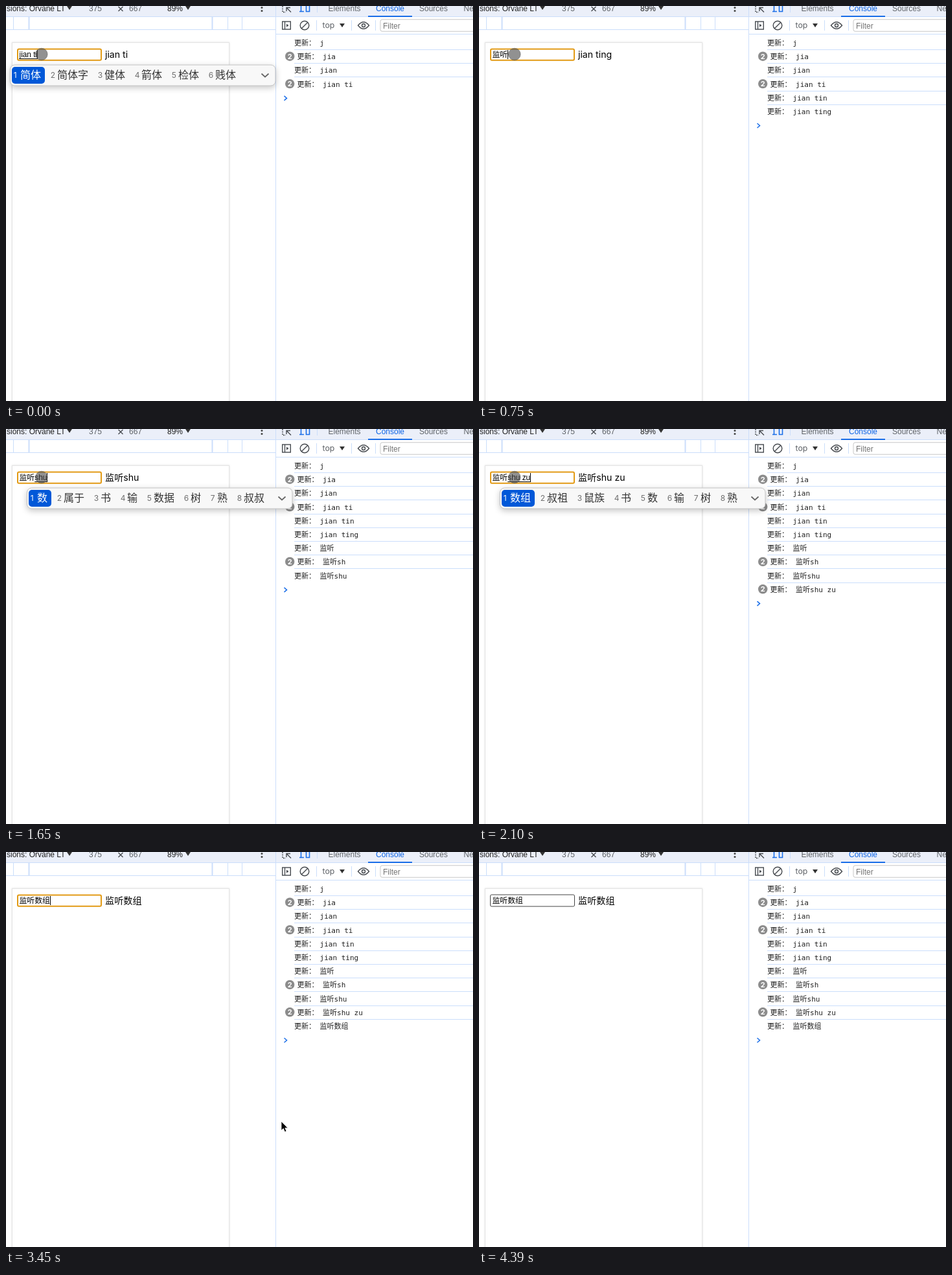
Recreate the animation shown at these times as an HTML page. Size 721 by 610 pixels, loop 4410 ms.

```html
<!DOCTYPE html>
<html lang="zh-CN">
<head>
<meta charset="utf-8">
<title>Input method and console</title>
<style>
html, body { margin: 0; width: 100%; height: 100%; overflow: hidden; background: #fff; }
svg { display: block; }
text { white-space: pre; font: 12px "Liberation Sans", "Noto Sans CJK SC", "Noto Sans CJK", sans-serif; fill: #1f1f1f; }
.field { font-size: 11.86px; fill: #000; }
.label { font: 14.15px Inter, "Noto Sans CJK SC", "Noto Sans CJK", sans-serif; fill: #000; }
.log { font: 11px "DejaVu Sans Mono", "Noto Sans CJK SC", "Noto Sans CJK", monospace; }
.word { font-size: 16px; fill: #333; }
.num { font: 12px Inter, sans-serif; fill: #6e6e6e; }
.on { fill: #fff; }
.badge { font: bold 11px Inter, sans-serif; fill: #fff; text-anchor: middle; }
.ui { font: 12.3px Inter, sans-serif; }
.dim { fill: #5f6368; }
.rule { stroke: #cbdefb; fill: none; }
.icon { stroke: #474b50; stroke-width: 1.4; fill: none; }
.panel { filter: drop-shadow(0 3px 5px rgba(0, 0, 0, .22)); }
</style>
</head>
<body>
<svg width="721" height="610" viewBox="0 0 721 610">
  <!-- device toolbar and rulers -->
  <rect width="721" height="16" fill="#ebeff9"/>
  <text x="1" y="8">sions: Orvane LT</text>
  <text x="128" y="8" class="dim">375</text>
  <text x="190" y="8" class="dim">667</text>
  <text x="249" y="8">89%</text>
  <path d="M94 0h8l-4 6zM277 0h8l-4 6zM515 27h8l-4 6z" fill="#333"/>
  <path d="M173.500 1l7 7m0-7l-7 7" class="icon" stroke-width="1.200"/>
  <g fill="#444"><circle cx="395" cy="2.500" r="1.500"/><circle cx="395" cy="7.500" r="1.500"/></g>
  <path class="rule" d="M0 16.500H721M0 36.500H416M11.500 17V36M342.500 17V36M364.500 17V36M416.500 0V610M417 43.500H721M480.500 0V10M479.500 22V38M533.500 22V38M570.500 22V38"/>
  <path class="rule" d="M35.500 17V36M318.500 17V36" stroke-width="2"/>
  <rect x="9.500" y="56.500" width="335" height="570" fill="#fff" stroke="#e4e4e4" style="filter:drop-shadow(0 0 1.500px rgba(0,0,0,.12))"/>

  <!-- console header -->
  <text x="497.500" y="8" class="dim">Elements</text>
  <text x="571" y="8" style="fill:#0b63e5">Console</text>
  <text x="638" y="8" class="dim">Sources</text>
  <text x="706.500" y="8" class="dim">Ne</text>
  <rect x="559" y="15" width="68" height="2" fill="#1a6ee8"/>
  <path class="icon" d="M427 0V9.500H432" stroke-dasharray="2 1.500"/>
  <path class="icon" d="M440 9.500L433.500 3M433 8V2.500H439"/>
  <path d="M455.500 0V8.500M453 8.500H460M463.500 0V8.500H468.500V0" fill="none" stroke="#1a6ee8" stroke-width="1.600"/>
  <g class="icon">
    <rect x="426.700" y="24" width="12.600" height="12"/>
    <path d="M430.500 24V36"/><path d="M433 27.500V32.500L436.500 30z" fill="#474b50" stroke="none"/>
    <circle cx="461" cy="30" r="6.800"/><path d="M456.200 34.800L465.800 25.200"/>
    <path d="M543.500 30Q552 19.500 560.500 30Q552 40.500 543.500 30z"/><circle cx="552" cy="30" r="2.500"/>
  </g>
  <text x="488.500" y="34" class="ui dim">top</text>
  <rect x="578" y="20.800" width="160" height="18.400" rx="3" fill="#fff" stroke="#c7c7c7"/>
  <text x="582" y="35" style="fill:#757575">Filter</text>
  <g id="live"></g>
</svg>
<script>
const LOOP = 4410;
const live = document.getElementById("live");
const pen = document.createElement("canvas").getContext("2d");
pen.font = '11.86px "Liberation Sans", "Noto Sans CJK SC", "Noto Sans CJK", sans-serif';

const logs = ["j", "2jia", "jian", "2jian ti", "jian tin", "jian ting", "监听",
  "2监听sh", "监听shu", "2监听shu zu", "监听数组"];

const listen = "监听 舰艇 健挺 渐停 坚挺 尖";
// start, committed text, composing text, label, log rows, candidates, caret hidden
const steps = [
  [0, "", "jian ti", "jian ti", 4, "简体 简体字 健体 箭体 检体 贱体"],
  [150, "", "jian tin", "jian ti", 4, listen],
  [300, "", "jian ting", "jian ting", 6, listen],
  [750, "监听", "", "jian ting", 6],
  [1050, "监听", "", "监听", 7, "", true],
  [1350, "监听", "sh", "监听sh", 7, "说 是 时 睡 上 ⬆ 时候 谁"],
  [1500, "监听", "shu", "监听sh", 7, "数 属于 书 输 数据 树 熟 叔叔"],
  [1650, "监听", "shu", "监听shu", 9, "数 属于 书 输 数据 树 熟 叔叔"],
  [1800, "监听", "shu z", "监听shu", 9, "数组 数字 书桌 输 数 书 树 熟"],
  [1950, "监听", "shu zu", "监听shu", 9, "数组 叔祖 鼠族 书 数 输 树 熟"],
  [2100, "监听", "shu zu", "监听shu zu", 10, "数组 叔祖 鼠族 书 数 输 树 熟"],
  [2250, "监听数组", "", "监听shu zu", 10],
  [2400, "监听数组", "", "监听数组", 11],
  [4390, "监听数组", "", "监听数组", 11, "", true]
];
// start, pointer tip
const pointer = [[3450, 425, 416], [3600, 574, 547], [3750, 623, 571], [3900, 672, 603], [4050, 0, -99]];

const at = (list, t) => list.filter(s => s[0] <= t).pop();
const text = (x, y, cls, s) => `<text x="${x}" y="${y}" class="${cls}">${s}</text>`;

function field(done, typing, noCaret, focus) {
  const from = 20.5 + pen.measureText(done).width;
  const to = from + pen.measureText(typing).width;
  return (focus
    ? '<rect x="18" y="66.500" width="129" height="17.200" rx="2" fill="#fff" stroke="#e29a14" stroke-width="2"/>'
    : '<rect x="17.500" y="66" width="130" height="18" rx="2" fill="#fff" stroke="#444"/>') +
    text(20.5, 79.2, "field", done + typing) +
    (typing ? `<path d="M${from} 81.500H${to}" stroke="#000"/>` : "") +
    (noCaret ? "" : `<path d="M${Math.round(to) + .5} 68V82" stroke="#000"/>`);
}

function logRow(s, i) {
  const y = 56.8 + 21.2 * i, twice = s[0] === "2";
  const line = i ? `<path class="rule" d="M445 ${Math.floor(y - 10.4) + .5}H721"/>` : "";
  const badge = twice ? `<circle cx="438.200" cy="${y - .3}" r="7.200" fill="#8c8c8c"/>` + text(438.2, y + 3.7, "badge", 2) : "";
  return line + badge + text(twice ? 449.5 : 445, y + 4.2, "log", "更新： " + (twice ? s.slice(1) : s));
}

function arrowTile(x) {
  return `<rect x="${x + .5}" y="96" width="20" height="20" rx="3.500" fill="#6f93b3" stroke="#527797"/>` +
    `<path d="M${x + 10.5} 99l7 7.500h-4v6.500h-6v-6.500h-4z" fill="#fff"/>`;
}

function panel(words, x) {
  let out = `<rect class="panel" x="${x + .5}" y="91" width="409.500" height="32" rx="7" fill="#f8f8f8" stroke="#c4c4c4"/>`;
  let left = x + 6;
  words.split(" ").forEach((w, i) => {
    const tile = w === "⬆", width = tile ? 22 : 16 * w.length, on = i ? "" : " on";
    if (on) out += `<rect x="${left - 3}" y="94" width="${width + 19}" height="26" rx="5" fill="#0058d8"/>`;
    out += text(left - .3, 111.2, "num" + on, i + 1) +
      (tile ? arrowTile(left + 10) : text(left + 10, 112.3, "word" + on, w));
    left += width + 25;
  });
  return out + `<path d="M${x + 388.5} 104.500l5.500 5 5.500-5" fill="none" stroke="#666" stroke-width="1.700"/>`;
}

function draw(t) {
  const [, done, typing, label, rows, words, noCaret] = at(steps, t);
  const mouse = at(pointer, t);
  const end = 57.6 + 21.2 * rows;
  live.innerHTML = field(done, typing, noCaret, t < 4390) +
    text(153, 79.6, "label", label) +
    logs.slice(0, rows).map(logRow).join("") +
    `<path d="M429.500 ${end - 3.5}l4 3.500-4 3.500" fill="none" stroke="#1a6ee8" stroke-width="1.500"/>` +
    (words ? panel(words, done ? 32 : 6) : "") +
    (mouse
      ? `<path transform="translate(${mouse[1]} ${mouse[2]})" d="M0 0V14L3.200 11 5.500 16.300 8 15.200 5.800 10.200H10z" fill="#000" stroke="#fff" stroke-width=".8"/>`
      : '<circle cx="54.800" cy="74.500" r="9.300" fill="#484848" fill-opacity=".6" stroke="#555" stroke-opacity=".5"/>');
}

let start, shown;
function tick(now) {
  start ??= now;
  const t = (now - start) % LOOP;
  const key = at(steps, t)[0] + "/" + at(pointer, t);
  if (key !== shown) draw(t);
  shown = key;
  requestAnimationFrame(tick);
}
draw(0);
requestAnimationFrame(tick);
</script>
</body>
</html>
```
